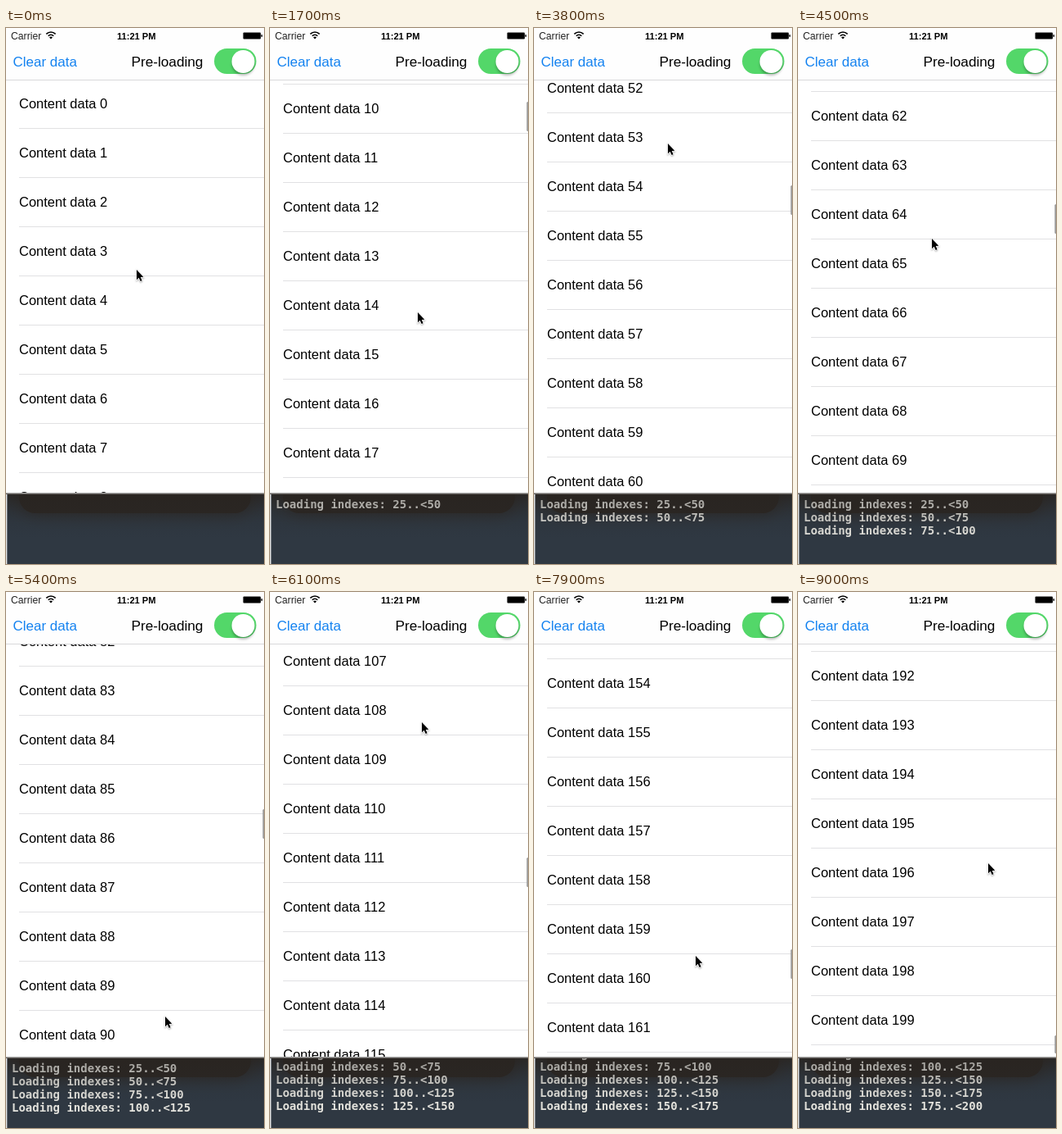
An HTML page with a canvas that plays this animation: 316 by 654 pixels, repeating every 9.1 s.

```html
<!DOCTYPE html>
<html lang="en">
<head>
<meta charset="utf-8">
<title>Pre-loading list</title>
<style>
  html, body { margin: 0; width: 100%; height: 100%; overflow: hidden; background: #fff; }
  canvas { display: block; width: 316px; height: 654px; }
</style>
</head>
<body>
<canvas id="stage"></canvas>
<script>
const W = 316, H = 654, LOOP = 9100, STEP = 100;
const NAV = 64, BOTTOM = 568, ROW = 60, ROWS = 200, PAGE = 25, MARGIN = 10;
const VIEW = BOTTOM - NAV, MAX = ROWS * ROW - VIEW;
const DRAG = 0.25, LOW = 518, HIGH = 110, BOUNCE = 8600;
const SANS = '"Liberation Sans", Arial, sans-serif';
const MONO = '"DejaVu Sans Mono", monospace';

const canvas = document.getElementById('stage');
const ctx = canvas.getContext('2d');
const dpr = window.devicePixelRatio || 1;
canvas.width = W * dpr;
canvas.height = H * dpr;

// Each touch-down: time, list offset, pointer x
const touches = [
  [850, 0, 168], [1800, 620, 182], [3000, 1867, 176], [4300, 3503, 157],
  [5400, 4952, 195], [6450, 6752, 181], [7800, 9150, 195], [9160, 12267, 238]
];

const lerp = (a, b, u) => a + (b - a) * u;
const clamp = (v, lo, hi) => Math.min(hi, Math.max(lo, v));

// Drag with rising speed, then exponential slow-down
function glide(u) {
  const tau = 0.42;
  return u < DRAG ? u * u / (2 * DRAG)
    : DRAG / 2 + tau * (1 - Math.exp((DRAG - u) / tau));
}

// The flick in progress and how far through it we are
function flickAt(t) {
  let i = 0;
  while (t > touches[i + 1][0]) i++;
  const [a, b] = [touches[i], touches[i + 1]];
  return { a, b, u: clamp((t - a[0]) / (b[0] - a[0]), 0, 1) };
}

function scrollAt(t) {
  if (t >= BOUNCE) {
    const dt = t - BOUNCE;
    return MAX + 1.91 * dt * Math.exp(-dt / 100);
  }
  const { a, b, u } = flickAt(t);
  return lerp(a[1], b[1], glide(u) / glide(1));
}

// The pointer pushes up while dragging, then returns for the next flick
function pointerAt(t) {
  if (t < touches[0][0]) {
    const u = clamp((t - 100) / 500, 0, 1), e = u * u * (3 - 2 * u);
    return [lerp(160, touches[0][2], e), lerp(295, LOW, e)];
  }
  const { a, b, u } = flickAt(t);
  const y = u < DRAG
    ? lerp(LOW, HIGH, (u / DRAG) ** 1.4)
    : lerp(HIGH, LOW, ((u - DRAG) / (1 - DRAG)) ** 3.6);
  return [lerp(a[2], b[2], u), y];
}

function text(str, x, y, font, color) {
  ctx.font = font;
  ctx.fillStyle = color;
  ctx.fillText(str, x, y);
}

function rect(x, y, w, h, color) {
  ctx.fillStyle = color;
  ctx.fillRect(x, y, w, h);
}

function pill(x, y, w, h, r, color) {
  ctx.beginPath();
  ctx.roundRect(x, y, w, h, r);
  ctx.fillStyle = color;
  ctx.fill();
}

function shadow(color, blur, dy) {
  ctx.shadowColor = color;
  ctx.shadowBlur = blur * dpr;
  ctx.shadowOffsetY = dy * dpr;
}

function clipped(y, h, draw) {
  ctx.save();
  ctx.beginPath();
  ctx.rect(0, y, W, h);
  ctx.clip();
  draw();
  ctx.restore();
}

function fade(y, h, from, to) {
  const g = ctx.createLinearGradient(0, y, 0, y + h);
  g.addColorStop(0, from);
  g.addColorStop(1, to);
  rect(0, y, W, h, g);
}

function drawList(s) {
  const first = Math.max(0, Math.floor(s / ROW) - 1);
  const last = Math.min(ROWS - 1, Math.floor((s + VIEW) / ROW));
  for (let i = first; i <= last; i++) {
    const y = i * ROW - s + NAV - 1;
    text('Content data ' + i, 16, y + 35, '16.5px ' + SANS, '#000');
    rect(16, y + 59, W - 16, 1, '#e1e1e3');
  }
}

function drawIndicator(s) {
  const top = Math.round(66 + Math.min(s, MAX) * 0.0401);
  const cut = clamp(s - MAX, 0, 28);
  pill(314.4, top + cut, 3, 36 - cut, 1.5, '#999');
}

function drawStatus() {
  text('Carrier', 6, 13.5, '12.2px ' + SANS, '#222');
  text('11:21 PM', 136, 13.5, 'bold 11.1px ' + SANS, '#000');
  ctx.strokeStyle = '#000';
  ctx.lineWidth = 1.7;
  const from = -Math.PI * 0.75, to = -Math.PI * 0.25;
  for (const r of [4.6, 8]) {
    ctx.beginPath();
    ctx.arc(55, 13, r, from, to);
    ctx.stroke();
  }
  ctx.beginPath();
  ctx.moveTo(55, 13.5);
  ctx.arc(55, 13.5, 2.8, from, to);
  ctx.fillStyle = '#000';
  ctx.fill();
  pill(290.5, 5.5, 21.5, 8, 1, '#000');
  pill(312.5, 8, 1.5, 3, 0.7, '#000');
}

function drawSwitch() {
  pill(255, 25, 51.5, 31, 15.5, '#53d769');
  ctx.save();
  shadow('rgba(0,0,0,.25)', 3, 3);
  pill(276.5, 27, 28, 28, 14, '#fff');
  ctx.restore();
}

function drawNav() {
  rect(0, 0, W, NAV, '#fefefe');
  rect(0, NAV - 1, W, 1, '#d9d9db');
  drawStatus();
  text('Clear data', 8.5, 47, '17px ' + SANS, '#1583f0');
  text('Pre-loading', 153.5, 47, '17.2px ' + SANS, '#000');
  drawSwitch();
}

function drawConsole(s) {
  const h = H - BOTTOM;
  rect(0, BOTTOM, W, h, '#2f3842');
  fade(BOTTOM, 40, 'rgba(43,40,37,.9)', 'rgba(47,56,66,0)');
  ctx.save();
  shadow('#2b2622', 20, 0);
  pill(16, BOTTOM - 80, W - 32, 104, 20, '#2b2622');
  ctx.restore();

  const lastRow = Math.floor((s + VIEW) / ROW);
  const lines = Math.min(ROWS / PAGE - 1, Math.floor((lastRow + MARGIN) / PAGE));
  const shift = lines > 4 ? (lines - 4) * 16 + 2 : 0;
  for (let i = 1; i <= lines; i++) {
    const label = 'Loading indexes: ' + i * PAGE + '..<' + (i + 1) * PAGE;
    text(label, 7, 570 + i * 16 - shift, 'bold 14px ' + MONO, '#e3e2dc');
  }
  fade(BOTTOM, 55, 'rgba(38,34,31,.38)', 'rgba(40,42,45,0)');
  rect(0, BOTTOM, 1, h, '#e4e5e6');
  rect(1, BOTTOM, 1, h, '#6d7379');
  rect(0, BOTTOM, W, 1, '#6b6764');
}

function drawPointer(x, y) {
  ctx.save();
  ctx.translate(Math.round(x), Math.round(y));
  ctx.scale(0.85, 0.88);
  ctx.beginPath();
  [[0, 0], [0, 14], [3.2, 11], [5.5, 16], [7.8, 15], [5.6, 10.2], [9.8, 10]]
    .forEach(([px, py]) => ctx.lineTo(px, py));
  ctx.closePath();
  shadow('rgba(0,0,0,.35)', 2, 1);
  ctx.lineWidth = 1.6;
  ctx.strokeStyle = '#fff';
  ctx.stroke();
  ctx.shadowColor = 'transparent';
  ctx.fillStyle = '#000';
  ctx.fill();
  ctx.restore();
}

function draw(t) {
  const s = Math.round(scrollAt(t));
  ctx.setTransform(dpr, 0, 0, dpr, 0, 0);
  rect(0, 0, W, H, '#fff');
  clipped(NAV, VIEW, () => {
    drawList(s);
    if (s > 0) drawIndicator(s);
  });
  drawNav();
  clipped(BOTTOM, H - BOTTOM, () => drawConsole(s));
  rect(0, BOTTOM - 1, W, 1, '#a3a3a3');
  drawPointer(...pointerAt(t));
}

const start = performance.now();
function tick() {
  const t = (performance.now() - start) % LOOP;
  draw(Math.floor(t / STEP) * STEP);
  requestAnimationFrame(tick);
}
tick();
</script>
</body>
</html>
```
